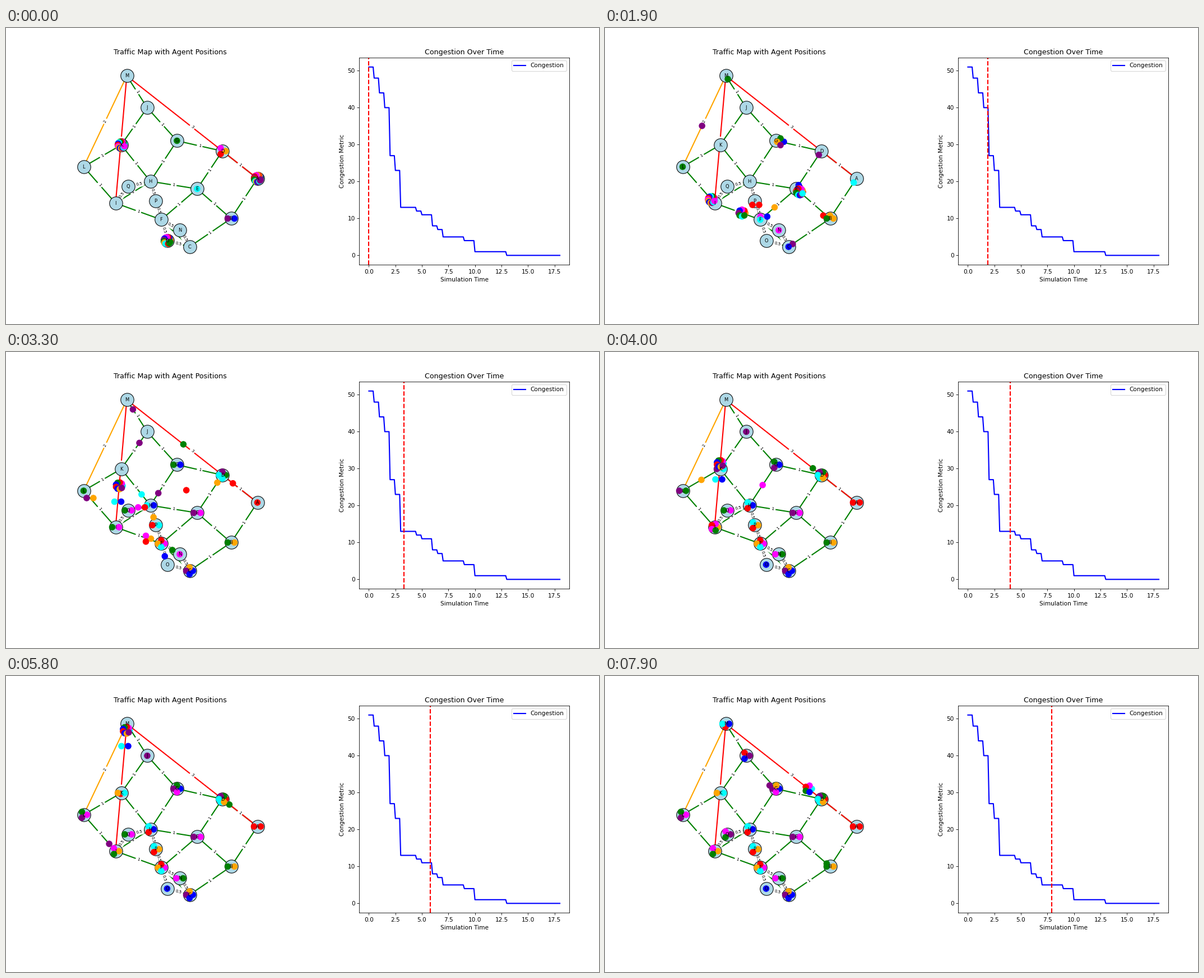
A matplotlib script that plays this animation: 1058 by 529 pixels, repeating every 8000 ms.

```python
import math
from collections import defaultdict

import matplotlib.pyplot as plt
import numpy as np
from matplotlib.animation import FuncAnimation

plt.rcParams["font.family"] = "DejaVu Sans"

W, H = 1058, 529
FRAMES, INTERVAL = 80, 100
RING = 6  # spread of agents that share one spot, in pixels

NODES = {
    "A": (448.5, 269), "B": (401.5, 340.5), "C": (327.5, 391), "D": (386, 220),
    "E": (341, 287.5), "F": (277, 342.5), "G": (305, 201.5), "H": (257.5, 274),
    "I": (195.5, 313), "J": (252, 142.5), "K": (205.5, 209), "L": (138.5, 248),
    "M": (215.5, 85.5), "N": (310, 361.5), "O": (287.5, 380), "P": (267, 309.5),
    "Q": (218, 283),
}

EDGES = dict.fromkeys(
    "AB AD BC BE DE DG EF EH FC FI GH GJ HI HK IL JK KL JM".split(), 1)
EDGES.update(dict.fromkeys("FN NC FO OC HP PF IQ QH".split(), 0.5))
EDGES.update(LM=2, AM=3, IM=4)

# colour and the nodes visited, in drawing order
AGENTS = """
blue BEFC, orange DEBC, magenta DEF, red DEBA, green GJMADEB,
blue ADG, green ADG, blue ADEH, orange ADGHP, red ABEF, orange ABEFI,
magenta ABE, magenta ABEFIL, red ABEFIM, purple ABEHG, red OCFPHHD,
red ABEDA, green ABED, purple BED, green ABEFN, cyan ABEHK, orange AB,
blue ABEFO, purple ABE, cyan EBAD, cyan ABED, purple ABC, purple ADGJKLIQ,
purple KLMJ, cyan KLIMA, green KL, magenta KLIMA, red KLIMA, green KLIMA,
cyan KLIH, blue KLIMA, red KLIMJ, magenta KLIQ, orange KLIF, blue KLIM,
orange KLIMJG, purple KLIMJG, cyan KLIP, magenta KLI,
orange OCFILK, blue OC, red OCFIQH, magenta OCFIQHG, magenta OCN,
blue OCFIMJ, purple OCFIL, green OCFIQ, orange OCFED, cyan OCF,
cyan OCFIM, red OCFP, green OCB, green OCFI
"""

# time from which each congestion level holds
LEVELS = [(0, 51), (0.5, 48), (1, 44), (1.5, 40), (2, 27), (2.5, 23), (3, 13),
          (4.5, 12), (5, 11), (6, 8), (6.5, 7), (7, 5), (9, 4), (10, 1), (13, 0)]


def hop_time(a, b):
    if a == b:
        return 0.3
    return EDGES.get(a + b, EDGES.get(b + a, 1))


def schedule(route):
    times = [0]
    for a, b in zip(route, route[1:]):
        times.append(times[-1] + hop_time(a, b))
    xs, ys = zip(*(NODES[n] for n in route))
    return times, xs, ys


def edge_color(weight):
    return "red" if weight >= 3 else "orange" if weight >= 2 else "green"


agents = [item.split() for item in AGENTS.replace("\n", " ").split(",")]
colors = [color for color, _ in agents]
plans = [schedule(route) for _, route in agents]


def positions(t):
    spots = [(np.interp(t, ts, xs), np.interp(t, ts, ys)) for ts, xs, ys in plans]
    groups = defaultdict(list)
    for k, (x, y) in enumerate(spots):
        groups[round(x, 2), round(y, 2)].append(k)
    out = np.array(spots)
    for members in groups.values():
        n = len(members)
        if n == 1:
            continue
        for j, k in enumerate(members):
            angle = 2 * math.pi * j / n
            out[k] += RING * math.cos(angle), -RING * math.sin(angle)
    return out


def draw_edge(ax, name, weight):
    (x0, y0), (x1, y1) = NODES[name[0]], NODES[name[1]]
    ax.plot([x0, x1], [y0, y1], color=edge_color(weight), lw=2, zorder=1,
            solid_capstyle="butt")
    angle = math.degrees(math.atan2(y0 - y1, x1 - x0))
    angle = (angle + 90) % 180 - 90
    ax.text((x0 + x1) / 2, (y0 + y1) / 2, f"{weight:g}", size=7, rotation=angle,
            rotation_mode="anchor" if False else "default",
            ha="center", va="center", zorder=1.1,
            bbox=dict(boxstyle="round", ec="white", fc="white"))


fig, (ax_map, ax_plot) = plt.subplots(1, 2, figsize=(14, 7), dpi=75.572)
fig.subplots_adjust(left=0.1, right=0.95, bottom=0.2, top=0.9, wspace=0.4)

# map, laid out in stage pixels
box = ax_map.get_position()
ax_map.set_xlim(box.x0 * W, box.x1 * W)
ax_map.set_ylim((1 - box.y0) * H, (1 - box.y1) * H)
ax_map.set_axis_off()
ax_map.set_title("Traffic Map with Agent Positions")
for name, weight in EDGES.items():
    draw_edge(ax_map, name, weight)
ax_map.scatter(*zip(*NODES.values()), s=500, c="lightblue", edgecolors="black",
               zorder=2)
for name, (x, y) in NODES.items():
    ax_map.text(x, y, name, size=8, ha="center", va="center", zorder=3)
dots = ax_map.scatter(*positions(0).T, s=100, c=colors, zorder=2.5)

# congestion chart
starts, values = zip(*LEVELS)
steps = np.arange(181)
level = [values[np.searchsorted(starts, s / 10, side="right") - 1] for s in steps]
ax_plot.plot(steps / 10, level, color="blue", lw=2, label="Congestion")
ax_plot.set_xlim(-0.9, 18.9)
ax_plot.set_ylim(-2.55, 53.55)
ax_plot.set_title("Congestion Over Time")
ax_plot.set_xlabel("Simulation Time")
ax_plot.set_ylabel("Congestion Metric")
ax_plot.legend(loc="upper right")
cursor = ax_plot.axvline(0, color="red", ls="--", lw=2)


def update(i):
    t = i / 10
    dots.set_offsets(positions(t))
    cursor.set_xdata([t, t])
    return dots, cursor


anim = FuncAnimation(fig, update, frames=FRAMES, interval=INTERVAL,
                     repeat=True, repeat_delay=0, blit=False)
plt.show()
```
